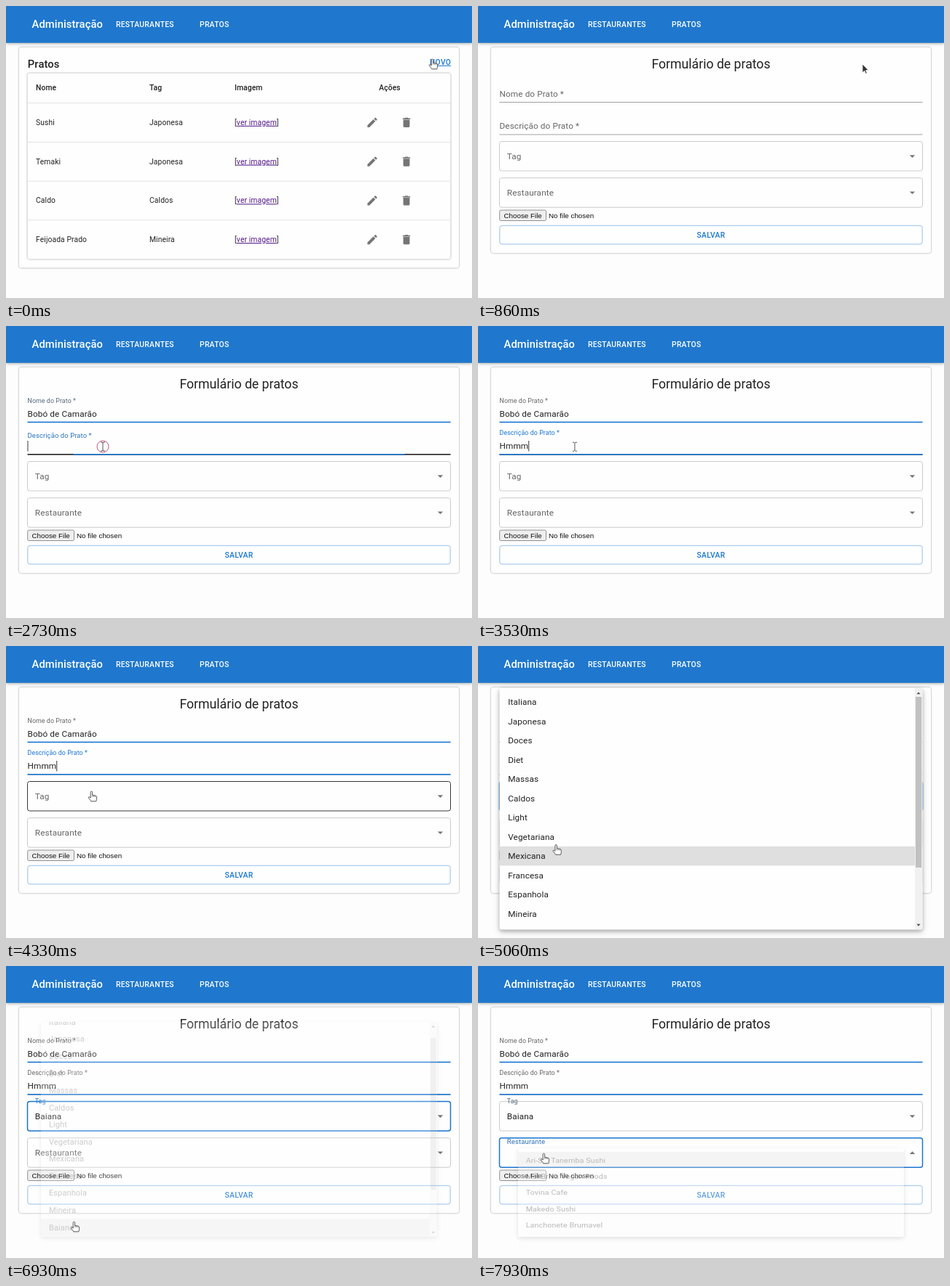
These frames come from a looping animation (640 by 402 pixels, 8 s). An HTML page:

```html
<!DOCTYPE html>
<html lang="pt">
<head>
<meta charset="utf-8">
<title>Administração</title>
<style>
html, body { margin: 0; width: 100%; height: 100%; overflow: hidden; background: #fdfdfd; }
svg { display: block; width: 640px; height: 402px; }
text { font-family: Roboto, sans-serif; fill: #212121; white-space: pre; }
.body { font-size: 11.78px; letter-spacing: .11px; }
.cell { font-size: 10.3px; letter-spacing: .11px; }
.btn { font-size: 10.3px; font-weight: 500; letter-spacing: .29px; }
.h6 { font-size: 14.72px; font-weight: 500; letter-spacing: .11px; }
.h5 { font-size: 17.67px; }
.file { font: 9.81px "Liberation Sans", Arial, sans-serif; fill: #111; }
.mid { text-anchor: middle; }
.bold { font-weight: 500; }
.white { fill: #fff; }
.blue { fill: #1976d2; }
.paper { fill: #fefefe; filter: drop-shadow(0 .8px .8px rgba(0,0,0,.3)) drop-shadow(0 .5px 1.2px rgba(0,0,0,.14)); }
.menu { fill: #fefefe; filter: drop-shadow(0 2px 2.5px rgba(0,0,0,.24)) drop-shadow(0 3px 5px rgba(0,0,0,.16)); }
.bar { fill: #1f78cd; filter: drop-shadow(0 1.5px 2px rgba(0,0,0,.32)); }
.icon { fill: #757575; }
.link { fill: #551a8b; text-decoration: underline; }
</style>
</head>
<body>
<svg id="stage" viewBox="0 0 640 402" xmlns="http://www.w3.org/2000/svg"></svg>
<script>
const LOOP = 8000, BLUE = [25, 118, 210], GREY = [102, 102, 102];
const ROW = 26.5, PAD = 5.9;
const T = { form: 500, name: 1500, desc: 2645, tagOpen: 4470, tagClose: 6756, restOpen: 7853 };

const text = (x, y, cls, s, id = '') => `<text ${id && `id="${id}"`} x="${x}" y="${y}" class="${cls}">${s}</text>`;
const rect = (x, y, w, h, attrs) => `<rect x="${x}" y="${y}" width="${w}" height="${h}" ${attrs}/>`;
const icon = (x, y, d) => `<path class="icon" transform="translate(${x - 8.83} ${y - 8.83}) scale(.736)" d="${d}"/>`;

const PENCIL = 'M3 17.25V21h3.75L17.81 9.94l-3.75-3.75L3 17.25zM20.71 7.04c.39-.39.39-1.02 0-1.41l-2.34-2.34c-.39-.39-1.02-.39-1.41 0l-1.83 1.83 3.75 3.75 1.83-1.83z';
const BIN = 'M6 19c0 1.1.9 2 2 2h8c1.1 0 2-.9 2-2V7H6v12zM19 4h-3.5l-1-1h-5l-1 1H5v2h14V4z';

const dishes = [['Sushi', 'Japonesa'], ['Temaki', 'Japonesa'], ['Caldo', 'Caldos'], ['Feijoada Prado', 'Mineira']];
const tags = ['Italiana', 'Japonesa', 'Doces', 'Diet', 'Massas', 'Caldos', 'Light', 'Vegetariana',
  'Mexicana', 'Francesa', 'Espanhola', 'Mineira', 'Baiana'];
const places = ['Ari-Sol Tanemba Sushi', 'Mel Brisa Vegan Foods', 'Tovina Cafe', 'Makedo Sushi', 'Lanchonete Brumavel'];

const dishRow = ([name, tag], i) => {
  const y = 160.3 + i * 53.75;
  return text(41, y + 3.5, 'cell', name) + text(197, y + 3.5, 'cell', tag) +
    text(314, y + 3.5, 'cell', '[<tspan class="link">ver imagem</tspan>]') +
    icon(503, y, PENCIL) + icon(550, y, BIN) +
    (i < 3 ? rect(29.5, y + 26.7, 581, .8, 'fill="#dcdcdc"') : '');
};

const listPage = `<g id="list">
  ${rect(18, 57, 604, 303.5, 'rx="3" class="paper"')}
  ${text(29.8, 85.3, 'h6', 'Pratos')}
  ${text(582, 80.8, 'btn blue', 'NOVO').replace('<text', '<text text-decoration="underline"')}
  ${rect(29.5, 92.5, 581, 256, 'rx="3" class="paper"')}
  ${text(41, 116.3, 'cell bold', 'Nome')}${text(197, 116.3, 'cell bold', 'Tag')}
  ${text(314, 116.3, 'cell bold', 'Imagem')}${text(527, 116.3, 'cell bold mid', 'Ações')}
  ${rect(29.5, 133.1, 581, .8, 'fill="#dcdcdc"')}
  ${dishes.map(dishRow).join('')}</g>`;

const field = (id, label, y) => `
  ${rect(29.5, y - .4, 581, .8, `id="${id}Line" fill="#8a8a8a"`)}
  ${rect(29.5, y - 1, 581, 1.6, `id="${id}Focus" fill="#1976d2"`)}
  ${text(0, 0, 'body', label, id + 'Label')}${text(29.5, y - 7.6, 'body', '', id + 'Value')}`;

const select = (id, label, y) => `
  ${rect(29.5, y, 581, 40.5, `id="${id}Box" rx="3" fill="none"`)}
  ${text(0, 0, 'body', label, id + 'Label')}${text(39.8, y + 24.3, 'body', '', id + 'Value')}
  <path id="${id}Arrow" class="icon" d="M-3.7 -1.8h7.4l-3.7 3.7z"/>`;

const formPage = `<g id="form">
  ${rect(18, 57, 604, 283, 'rx="3" class="paper"')}
  ${text(320, 86.2, 'h5 mid', 'Formulário de pratos')}
  ${field('name', 'Nome do Prato *', 132.6)}${field('desc', 'Descrição do Prato *', 177)}
  ${select('tag', 'Tag', 186.5)}${select('rest', 'Restaurante', 236.7)}
  ${rect(29.7, 281, 63.8, 14.5, 'rx="1.8" fill="#efefef" stroke="#767676" stroke-width=".8"')}
  ${text(35.5, 291.7, 'file', 'Choose File')}${text(97, 291.7, 'file', 'No file chosen')}
  ${rect(29.8, 302.3, 580.4, 25.6, 'rx="3" fill="none" stroke="#8cbae8" stroke-width=".9"')}
  ${text(320, 318.7, 'btn mid blue', 'SALVAR')}
  <rect id="caret" width=".9" height="14.5" fill="#222"/></g>`;

const menu = (id, items, top, h, rowW, extra = '') => `
  <clipPath id="${id}Clip">${rect(29.5, top, 581, h, 'rx="3"')}</clipPath>
  <g id="${id}Menu">${rect(29.5, top, 581, h, 'rx="3" class="menu"')}
  <g clip-path="url(#${id}Clip)"><g id="${id}Items">
  ${rect(29.5, 0, rowW, ROW, `id="${id}Row" fill-opacity=".12"`)}
  ${items.map((s, i) => text(41.2, top + PAD + (i + .5) * ROW + 4.2, 'body', s)).join('')}</g>${extra}</g></g>`;

const TAG_TOP = 58, TAG_H = 332.5, REST_TOP = 246, REST_H = 144.3;
const scrollbar = rect(600, TAG_TOP, 11, TAG_H, 'fill="#f1f1f1"') +
  rect(601, 70, 8.3, 235, 'id="thumb" fill="#c1c1c1"') +
  '<path d="M602.4 66.3h5.2l-2.6 -2.9zM602.4 382.8h5.2l-2.6 2.9z" fill="#505050"/>';

const cursors = `<g id="cursor">
  <circle id="ring" r="8" fill="none" stroke="#c4587c" stroke-width="1"/>
  <g id="hand" fill="#fff" stroke="#555" stroke-width="1" stroke-linejoin="round">
    <path d="M-2.8 2V-5.7a1.2 1.2 0 0 1 2.4 0V-1.8l4.6.9q1.4.3 1.4 1.7V2.8q0 1.8-.8 4H-2.2q-.4-1.2-2.6-3.6q-1.6-1.7-.6-2.4q1-.6 2.6 1.2z"/>
    <path d="M-.4 -1.8V.8M1.6 -1.2V1M3.6 -.8V1.2" stroke-width=".7"/></g>
  <path id="beam" d="M-3 -6h2l1 1 1-1h2M0 -5V5M-3 6h2l1-1 1 1h2" fill="none" stroke="#555" stroke-width="1"/>
  <path id="arrow" d="M-3 -6V6l2.8-2.6 1.8 4 1.8-.8-1.8-3.9h3.7z" fill="#333" stroke="#fff" stroke-width=".8"/></g>`;

document.getElementById('stage').innerHTML = rect(0, 0, 640, 402, 'fill="#fdfdfd"') + listPage + formPage +
  rect(0, 0, 640, 50.8, 'class="bar"') +
  text(35.5, 30.2, 'h6 white', 'Administração') +
  text(151, 28.7, 'btn white', 'RESTAURANTES') + text(266, 28.7, 'btn white', 'PRATOS') +
  menu('tag', tags, TAG_TOP, TAG_H, 570.5, scrollbar) +
  menu('rest', places, REST_TOP, REST_H, 581) + cursors;

const el = {};
document.querySelectorAll('[id]').forEach(n => el[n.id] = n);
const set = (id, attrs) => { for (const k in attrs) el[id].setAttribute(k, attrs[k]); };
const show = (id, on) => set(id, { visibility: on ? 'visible' : 'hidden' });

const clamp = v => Math.max(0, Math.min(1, v));
const mix = (a, b, p) => a + (b - a) * p;
const shade = (a, b, p) => `rgb(${a.map((v, i) => Math.round(mix(v, b[i], p)))})`;

function bezier(x1, x2, y1, y2) {
  const at = (a, b, u) => 3 * a * u * (1 - u) ** 2 + 3 * b * u * u * (1 - u) + u ** 3;
  return x => {
    let lo = 0, hi = 1;
    for (let i = 0; i < 24; i++) {
      const m = (lo + hi) / 2;
      if (at(x1, x2, m) < x) lo = m; else hi = m;
    }
    return at(y1, y2, (lo + hi) / 2);
  };
}
const easeOut = bezier(0, .2, 0, 1), standard = bezier(.4, .2, 0, 1);
const ramp = (t, start, dur, ease) => ease(clamp((t - start) / dur));
const focusRamp = (t, start) => ramp(t, start, 200, easeOut);

// time, x, y
const path = [[0, 587, 80], [700, 587, 80], [1400, 170, 124], [1860, 164, 134], [2300, 164, 134], [2600, 133, 166],
  [3500, 133, 166], [4200, 119, 207], [4700, 119, 207], [5500, 95, 379], [6760, 95, 379], [6930, 95, 359],
  [7700, 92, 265], [LOOP, 92, 265]];

function pointer(t) {
  const i = path.findIndex(p => p[0] > t), [a, b] = [path[i - 1], path[i]];
  const u = (t - a[0]) / (b[0] - a[0]), p = u * u * (3 - 2 * u);
  return [mix(a[1], b[1], p), mix(a[2], b[2], p)];
}

const typed = (s, t, start, step) => s.slice(0, Math.max(0, Math.floor((t - start) / step) + 1));

function drawLabel(id, x, y0, y1, shrink, focus) {
  set(id + 'Label', {
    transform: `translate(${x} ${mix(y0, y1, shrink)}) scale(${mix(1, .75, shrink)})`,
    style: `fill:${shade(GREY, BLUE, focus)}`
  });
}

function drawField(id, y, shrink, on, off, hover) {
  const w = 581 * (on < 1 ? on : 1 - off);
  drawLabel(id, 29.5, y - 7.6, y - 26.8, shrink, on - off);
  set(id + 'Focus', { x: 320 - w / 2, width: w });
  set(id + 'Line', {
    y: y - (hover ? 1 : .4), height: hover ? 1.6 : .8, fill: hover ? '#212121' : '#8a8a8a'
  });
}

function drawSelect(id, y, shrink, color, focused, hover, open) {
  drawLabel(id, 39.8, y + 24.3, y + 2.7, shrink, color);
  set(id + 'Box', {
    stroke: focused ? '#1976d2' : hover ? '#212121' : '#c4c4c4',
    'stroke-width': focused ? 1.5 : .9
  });
  set(id + 'Arrow', { transform: `translate(596.5 ${y + 20.5}) rotate(${open ? 180 : 0})` });
}

function drawMenu(id, t, dur, open, close, originY) {
  const live = t >= open && t < close + dur;
  show(id + 'Menu', live);
  if (!live) return;
  const grow = ramp(t, open, dur * .666, standard) - ramp(t, close + dur * .333, dur * .666, standard);
  const alpha = ramp(t, open, dur, standard) - ramp(t, close, dur, standard);
  set(id + 'Menu', {
    opacity: alpha,
    transform: `translate(320 ${originY}) scale(${mix(.75, 1, grow)} ${mix(.5625, 1, grow)}) translate(-320 ${-originY})`
  });
}

function drawRow(id, top, count, y, scroll) {
  const i = Math.floor((y - top - PAD + scroll) / ROW);
  set(id + 'Row', { y: top + PAD + Math.max(0, Math.min(count - 1, i)) * ROW });
}

function render(t) {
  const [x, y] = pointer(t), form = t >= T.form;
  const tagLive = t >= T.tagOpen && t < T.tagClose, restLive = t >= T.restOpen;
  const modal = (t >= T.tagOpen && t < T.tagClose + 347) || restLive;
  const inside = (a, b) => form && !modal && x > 29 && x < 611 && y > a && y < b;
  show('list', !form);
  show('form', form);

  const nameText = typed('Bobó de Camarão', t, 1950, 36);
  const descText = typed('Hmmm', t, 2940, 120);
  el.nameValue.textContent = nameText;
  el.descValue.textContent = descText;
  el.tagValue.textContent = t >= T.tagClose ? 'Baiana' : '';

  const overName = inside(111, 135), overDesc = inside(155, 179);
  const overTag = inside(186, 228), overRest = inside(236, 278);
  const nameOn = focusRamp(t, T.name), descOn = focusRamp(t, T.desc);
  const tagOn = focusRamp(t, T.tagOpen), restOn = focusRamp(t, T.restOpen);
  drawField('name', 132.6, nameOn, nameOn, descOn, overName);
  drawField('desc', 177, descOn, descOn, tagOn, overDesc);
  drawSelect('tag', 186.5, tagOn, tagOn - restOn, t >= T.tagOpen && !restLive, overTag, tagLive);
  drawSelect('rest', 236.7, restOn, restOn, restLive, overRest, restLive);

  const inDesc = t >= T.desc, last = inDesc ? (descText ? 3300 : T.desc) : (nameText ? 2454 : T.name);
  const value = inDesc ? 'desc' : 'name', filled = el[value + 'Value'].textContent;
  const blink = t < last || (t - last) % 1000 < 500;
  set('caret', {
    x: 29.5 + (filled ? el[value + 'Value'].getComputedTextLength() : 0),
    y: inDesc ? 158 : 114,
    visibility: t >= T.name && t < T.tagOpen && blink ? 'visible' : 'hidden'
  });

  const scroll = 19 * ramp(t, 5480, 180, easeOut);
  drawMenu('tag', t, 347, T.tagOpen, T.tagClose, 229);
  drawMenu('rest', t, 280, T.restOpen, LOOP, 277.5);
  set('tagItems', { transform: `translate(0 ${-scroll})` });
  set('thumb', { y: 70 + scroll * .7 });
  drawRow('tag', TAG_TOP, tags.length, t < T.tagClose ? y : 379, scroll);
  drawRow('rest', REST_TOP, places.length, y, 0);

  const beam = overName || overDesc;
  const hand = modal || overTag || overRest || inside(302, 328) || (!form && x > 580);
  set('cursor', { transform: `translate(${x} ${y})` });
  show('beam', beam);
  show('hand', hand);
  show('arrow', !beam && !hand);
  show('ring', [T.name, T.desc].some(c => t >= c - 40 && t < c + 160));
}

const start = performance.now();
function tick() {
  render((performance.now() - start) % LOOP);
  requestAnimationFrame(tick);
}
tick();
</script>
</body>
</html>
```
